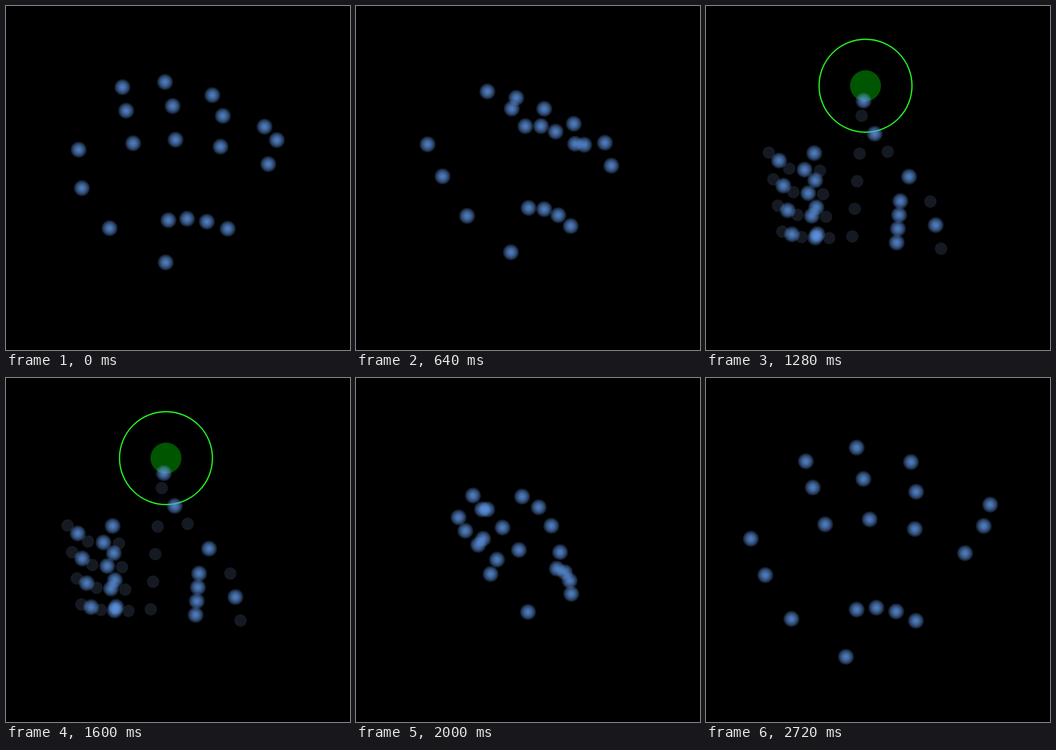
Write an HTML page with a canvas that moves like this. It is 644 by 644 pixels and loops after 2800 ms.

```html
<!DOCTYPE html>
<html lang="en">
<head>
<meta charset="utf-8">
<title>Hand tracking</title>
<style>
  html, body { margin: 0; width: 100%; height: 100%; overflow: hidden; background: #000; }
  canvas { display: block; }
</style>
</head>
<body>
<canvas id="stage" width="644" height="644"></canvas>
<script>
const ctx = document.getElementById('stage').getContext('2d');
const LOOP = 2800, STEP = 80, THUMB_TIP = 4;

const mix = (a, b, k) => a.map((v, i) => v + (b[i] - v) * k);
const easeIn = power => u => u ** power;
const easeOut = power => u => 1 - (1 - u) ** power;

// Joints of a hand: wrist, thumb, then four fingers, each from base to tip.
// The middle fingers lie between index and little finger, pushed out by an
// arch that changes evenly from knuckles to tips.
function makeHand({ wrist, thumb, index, little, arch }) {
  const hand = [wrist, ...thumb];
  for (let finger = 0; finger < 4; finger++) {
    const bulge = finger * (3 - finger) / 2;
    for (let joint = 0; joint < 4; joint++) {
      const push = mix(arch[0], arch[1], joint / 3);
      const base = mix(index[joint], little[joint], finger / 3);
      hand.push(base.map((v, axis) => v + bulge * push[axis]));
    }
  }
  return hand;
}

// Moves the wrist by an offset, and thumb and finger joints by rules.
function adjust(hand, wristShift, thumbShift, fingerShift) {
  return hand.map(([x, y], i) => {
    const chain = Math.floor((i - 1) / 4), joint = (i - 1) % 4;
    const [dx, dy] = i === 0 ? wristShift
      : chain === 0 ? thumbShift(joint) : fingerShift(chain - 1, joint);
    return [x + dx, y + dy];
  });
}

const openPalm = makeHand({
  wrist: [360, 510],
  thumb: [[238, 450], [150, 382], [134, 300], [138, 238]],
  index: [[248, 292], [228, 222], [222, 170], [214, 134]],
  little: [[470, 324], [512, 268], [502, 234], [466, 218]],
  arch: [[-4, -16], [-10, -38]]
});
const curling = makeHand({
  wrist: [340, 495],
  thumb: [[240, 427], [176, 359], [148, 279], [120, 239]],
  index: [[306, 261], [328, 189], [272, 155], [220, 165]],
  little: [[464, 329], [492, 269], [440, 243], [380, 273]],
  arch: [[6, -18], [-12, 3]]
});
const thumbUp = makeHand({
  wrist: [455, 458],
  thumb: [[420, 366], [340, 269], [289, 198], [286, 138]],
  index: [[342, 252], [155, 250], [188, 280], [244, 284]],
  little: [[317, 407], [169, 398], [200, 408], [250, 410]],
  arch: [[0, 0], [0, 2]]
});
const thumbHeld = adjust(thumbUp, [-16, -4],
  joint => [joint ** 4 / 6, 4 * joint],
  (finger, joint) => [4 * finger - 32 - 26 * 0.3 ** joint, 26]);
const uncurling = makeHand({
  wrist: [385, 470],
  thumb: [[259, 406], [245, 328], [231, 274], [241, 218]],
  index: [[367, 244], [255, 200], [183, 240], [201, 282]],
  little: [[421, 338], [343, 314], [267, 330], [261, 350]],
  arch: [[12, -18], [-16, 2]]
});
const reopened = makeHand({
  wrist: [325, 550],
  thumb: [[199, 482], [121, 418], [101, 322], [67, 286]],
  index: [[227, 312], [193, 248], [177, 178], [163, 154]],
  little: [[449, 348], [477, 308], [479, 250], [461, 232]],
  arch: [[0, -21], [-6, -59]]
});
// The little finger swings outwards most.
const spread = adjust(reopened, [0, 10],
  joint => [0, 2 - 2 * joint],
  (finger, joint) => [12 + 2 * joint + 18 * joint * (finger / 3) ** 8,
                      2 * finger - 5 - 2 * joint]);

const moves = [
  { start: 0, end: 640, from: openPalm, to: curling, ease: easeIn(8) },
  { start: 640, end: 960, from: curling, to: thumbUp, ease: easeOut(1.5) },
  { start: 960, end: 1600, from: thumbUp, to: thumbHeld, ease: easeOut(4) },
  { start: 1600, end: 2000, from: thumbHeld, to: uncurling, ease: easeIn(2.5) },
  { start: 2000, end: 2320, from: uncurling, to: reopened, ease: easeOut(1.6) },
  { start: 2320, end: 2720, from: reopened, to: spread, ease: easeOut(1.5) }
];

function handAt(time) {
  const { start, end, from, to, ease } = moves.find(move => time <= move.end);
  const k = ease((time - start) / (end - start));
  return from.map((joint, i) => mix(joint, to[i], k));
}

function circle([x, y], radius) {
  ctx.beginPath();
  ctx.arc(x, y, radius, 0, 2 * Math.PI);
}

function disc(center, radius, color) {
  circle(center, radius);
  ctx.fillStyle = color;
  ctx.fill();
}

function glow(center) {
  for (let radius = 15; radius > 0; radius -= 2) {
    disc(center, radius, 'rgba(100, 155, 235, 0.2)');
  }
}

function drawThumbUp(hand) {
  hand.forEach((joint, i) => { if (i !== THUMB_TIP) disc(joint, 11.5, '#151922'); });
  disc(hand[THUMB_TIP], 29, '#005500');
  circle(hand[THUMB_TIP], 87);
  ctx.strokeStyle = '#22f022';
  ctx.lineWidth = 2.4;
  ctx.stroke();
}

function draw(time) {
  const hand = handAt(time);
  ctx.fillStyle = '#000';
  ctx.fillRect(0, 0, 644, 644);
  if (time >= 880 && time <= 1760) drawThumbUp(hand);

  // One glowing dot in the middle of every bone.
  for (let i = 1; i < hand.length; i++) {
    const parent = i % 4 === 1 ? hand[0] : hand[i - 1];
    glow(mix(parent, hand[i], 0.5));
  }
}

const origin = performance.now();
function tick() {
  const elapsed = (performance.now() - origin) % LOOP;
  draw(Math.floor(elapsed / STEP) * STEP);
  requestAnimationFrame(tick);
}
tick();
</script>
</body>
</html>
```
